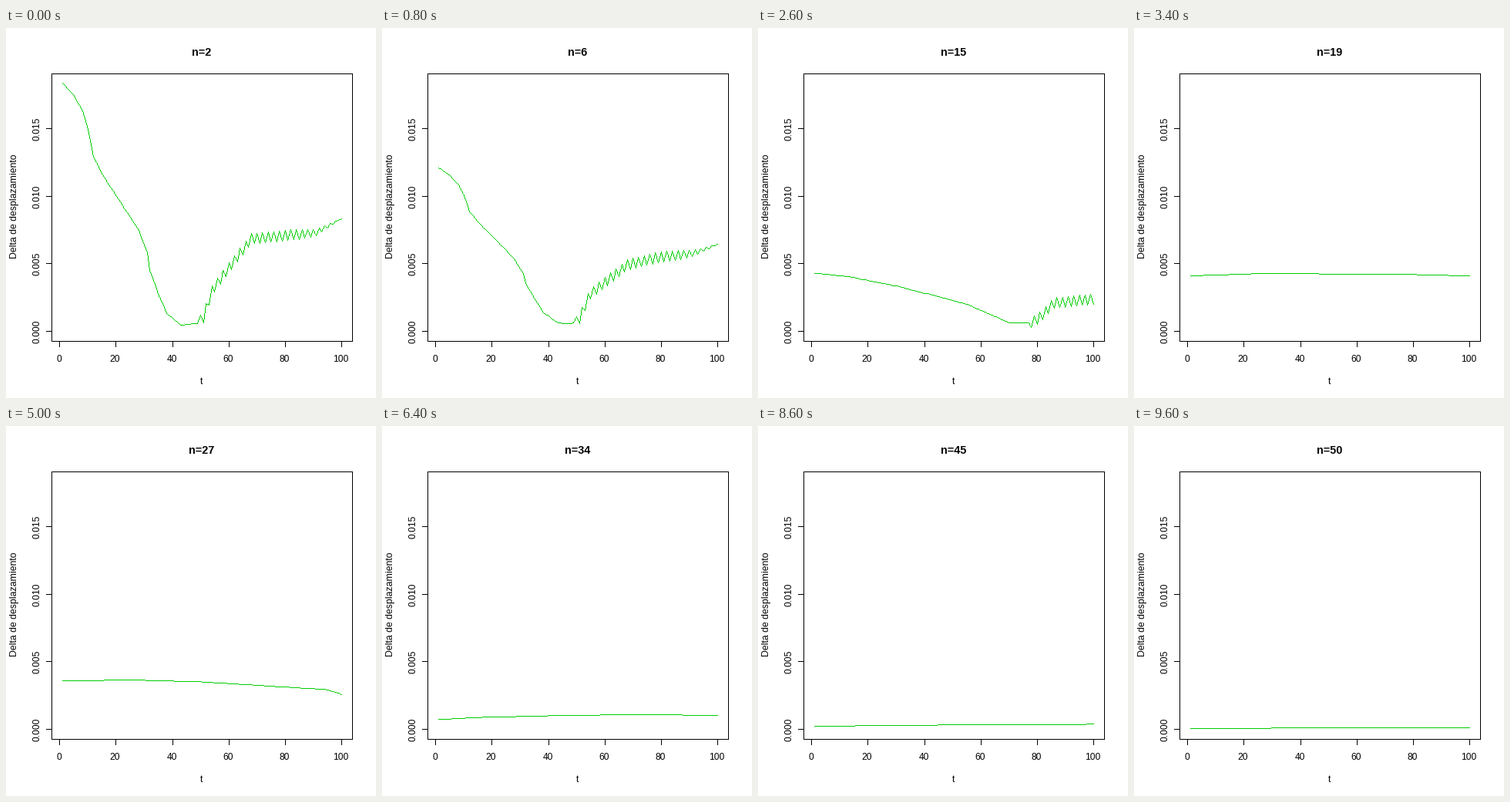
Animation of 480 by 480 pixels, one loop 9800 ms. Source, as a matplotlib script:

```python
import numpy as np
import matplotlib.pyplot as plt
from matplotlib.animation import FuncAnimation

SIZE, DPI = 480, 100
PX = 72 / DPI                      # one pixel in points
LEFT, RIGHT, TOP, BOTTOM = 59.5, 449.5, 59.5, 406.5
GREEN = (0, 205, 0)
TURN = 50                          # time of the dip, where the zigzag starts
T = np.arange(1, 101)

plt.rcParams["font.family"] = "Liberation Sans"

# Key points (time, value in thousandths) of the curve at a few steps n.
KEYS = {
    2: [(1, 18.35), (5, 17.45), (8.5, 16.1), (10, 14.95), (11.7, 13),
        (15, 11.65), (20, 10.05), (28, 7.5), (31, 5.85), (32, 4.5),
        (35, 2.75), (38, 1.3), (43, 0.47), (49, 0.6), (51, 1.0),
        (54, 3.0), (60, 4.7), (68, 6.85), (91, 7.3), (100, 8.35)],
    11: [(1, 4.3), (8.5, 4.05), (20, 3.3), (35, 2.05), (45, 0.63),
         (50, 0.65), (52, 1.05), (55, 2.1), (68, 2.5), (78, 3.4),
         (88, 3.75), (100, 4.05)],
    19: [(1, 4.11), (27, 4.285), (80, 4.205), (100, 4.1)],
    27: [(1, 3.58), (25, 3.66), (50, 3.52), (95, 2.94), (100, 2.6)],
    34: [(1, 0.74), (16, 0.89), (40, 1.01), (70, 1.1), (100, 1.04)],
    41: [(1, 0.34), (20, 0.44), (60, 0.54), (100, 0.595)],
    50: [(1, 0.07), (30, 0.097), (100, 0.12)],
}


def sx(t):
    return np.floor(69.86 + 3.6543 * t).astype(int)


def sy(v):
    return np.floor(393.69 - 17.55 * v).astype(int)


def shape(key, t):
    return np.interp(t, *zip(*KEYS[key]))


def zigzag(n, t):
    """Ripple after the dip, alternating with the parity of n + T."""
    size = 0.38 * np.clip((100 - t) / 15, 0, 1) * (t >= TURN)
    return np.where((n + T) % 2 == 0, size, -size)


def curve(n):
    if 11 < n < 19:                # the dip slides out to the right
        t = T * TURN / (TURN + 7 * (n - 11))
        return shape(11, t) + zigzag(n, t)
    a = max(k for k in KEYS if k <= n)
    b = min(k for k in KEYS if k >= n)
    w = (n - a) / (b - a) if b > a else 0
    y = (1 - w) * shape(a, T) + w * shape(b, T)
    return y + zigzag(n, T) if n < 19 else y


def raster(x, y):
    """One-pixel-wide polyline on a white stage."""
    img = np.full((SIZE, SIZE, 3), 255, np.uint8)
    for x0, y0, x1, y1 in zip(x, y, x[1:], y[1:]):
        steps = max(abs(x1 - x0), abs(y1 - y0)) + 1
        cols = np.rint(np.linspace(x0, x1, steps)).astype(int)
        rows = np.rint(np.linspace(y0, y1, steps)).astype(int)
        img[rows, cols] = GREEN
    return img


fig = plt.figure(figsize=(SIZE / DPI, SIZE / DPI), dpi=DPI, facecolor="white")
ax = fig.add_axes([0, 0, 1, 1])
plot = ax.imshow(raster([], []), extent=(0, SIZE, SIZE, 0), aspect="auto",
                 interpolation="nearest")
ax.set_xlim(0, SIZE)
ax.set_ylim(SIZE, 0)
ax.axis("off")


def stroke(x, y):
    ax.plot(x, y, color="black", lw=PX, antialiased=False, snap=False,
            solid_capstyle="projecting", solid_joinstyle="miter")


def label(x, y, text, size=12, **kw):
    return ax.text(x, y, text, fontsize=size * PX, ha="center",
                   va="baseline", rotation_mode="anchor", **kw)


stroke([LEFT, RIGHT, RIGHT, LEFT, LEFT], [TOP, TOP, BOTTOM, BOTTOM, TOP])
for t in range(0, 101, 20):
    stroke([sx(t) + 0.5] * 2, [BOTTOM, BOTTOM + 7])
    label(sx(t) - 0.5, 433, str(t))
for v in range(0, 16, 5):
    stroke([LEFT - 7, LEFT], [sy(v) + 0.5] * 2)
    label(43, sy(v) + 0.5, f"{v / 1000:.3f}", rotation=90)
label(253.5, 462, "t")
label(14, 231, "Delta de desplazamiento", 12.3, rotation=90)
title = label(253.5, 36, "", 14.4, weight="bold")


def draw(i):
    n = i + 2
    plot.set_data(raster(sx(T), sy(curve(n))))
    title.set_text(f"n={n}")
    return plot, title


anim = FuncAnimation(fig, draw, frames=49, interval=200, repeat=True,
                     repeat_delay=0, blit=False)
plt.show()
```
